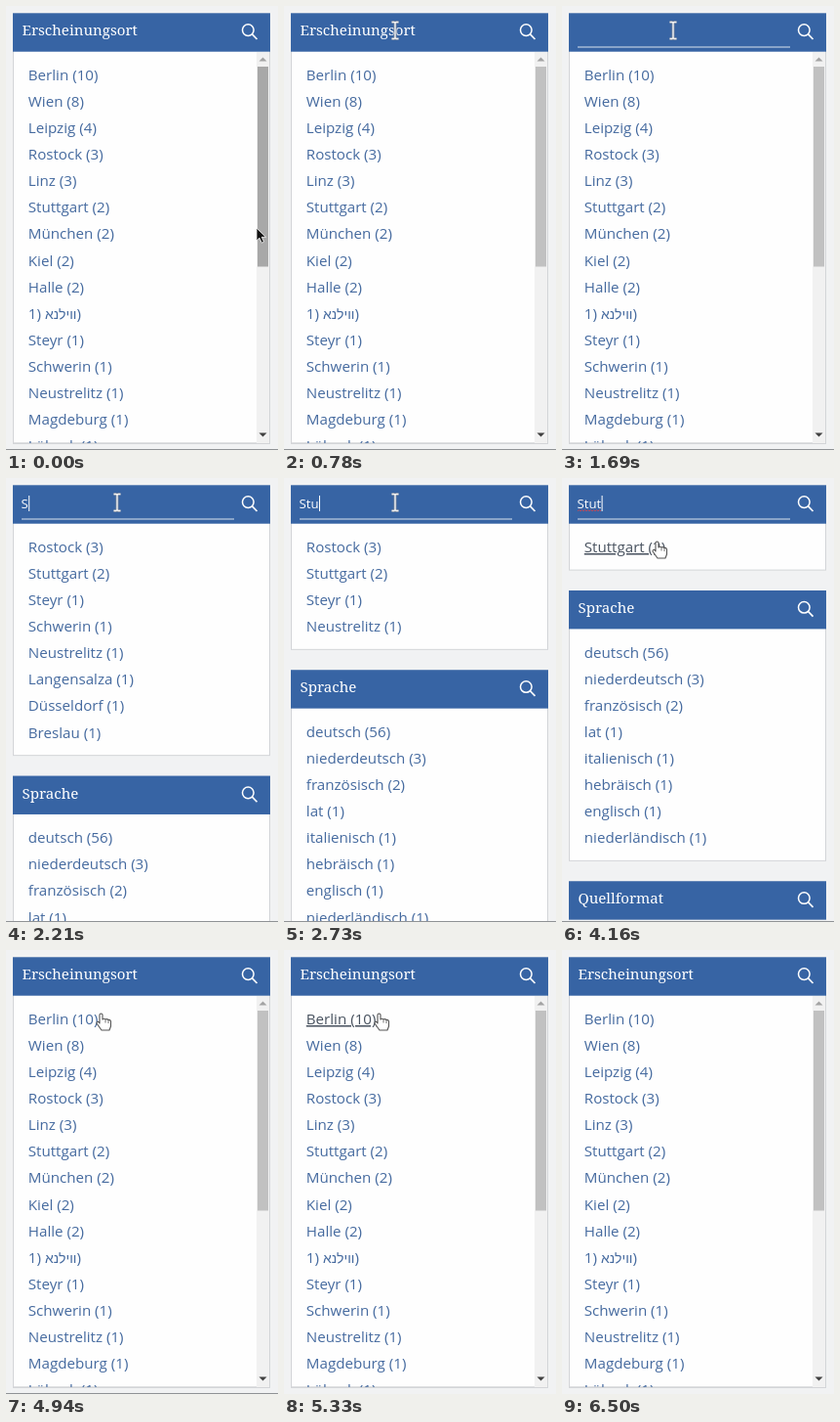
Recreate the animation shown at these times as an HTML page. Size 279 by 454 pixels, loop 8 s.

```html
<!DOCTYPE html>
<html lang="de">
<head>
<meta charset="utf-8">
<style>
html, body { margin: 0; width: 100%; height: 100%; overflow: hidden; background: #f1f2f3; }
svg { display: block; width: 279px; height: 454px; }
.title { font: 15.1px "Noto Serif", serif; fill: #fff; }
.item { font: 15.15px "Open Sans", "Noto Sans", sans-serif; fill: #456a9f; }
.hebrew { font: 14px "Liberation Sans", sans-serif; }
.hover { fill: #48525f; text-decoration: underline; }
.input { font: 13.2px "Open Sans", sans-serif; fill: #fff; }
</style>
</head>
<body>
<svg id="stage" viewBox="0 0 279 454"></svg>
<script>
const stage = document.getElementById("stage");
const STEP = 130, LOOP = 8000, ROW = 27.08, TOP = 7.3;
const places = ["Berlin (10)", "Wien (8)", "Leipzig (4)", "Rostock (3)", "Linz (3)", "Stuttgart (2)",
  "München (2)", "Kiel (2)", "Halle (2)", '1) <tspan class="hebrew">ווילנא</tspan>)', "Steyr (1)",
  "Schwerin (1)", "Neustrelitz (1)", "Magdeburg (1)", "Lübeck (1)"];
const matches = {
  S: ["Rostock (3)", "Stuttgart (2)", "Steyr (1)", "Schwerin (1)", "Neustrelitz (1)",
    "Langensalza (1)", "Düsseldorf (1)", "Breslau (1)"],
  St: ["Rostock (3)", "Stuttgart (2)", "Steyr (1)", "Neustrelitz (1)"],
  Stu: ["Stuttgart (2)"]
};
const languages = ["deutsch (56)", "niederdeutsch (3)", "französisch (2)", "lat (1)",
  "italienisch (1)", "hebräisch (1)", "englisch (1)", "niederländisch (1)"];

// Latest value whose start time has passed
const at = (t, keys) => keys.filter(k => k[0] <= t).pop()[1];
const rect = (x, y, w, h, fill, stroke = "none") =>
  `<rect x="${x}" y="${y}" width="${w}" height="${h}" fill="${fill}" stroke="${stroke}"/>`;
const path = (d, fill, stroke = "none", width = 1) =>
  `<path d="${d}" fill="${fill}" stroke="${stroke}" stroke-width="${width}" stroke-linejoin="round"/>`;
const text = (x, y, cls, s) => `<text x="${x}" y="${y}" class="${cls}">${s}</text>`;
const panelHeight = rows => 87.3 + ROW * (rows.length - 1);

function header(y, label) {
  return rect(7, y, 264, 39.4, "#3764a4") + text(16.5, y + 23, "title", label) +
    `<circle cx="248.3" cy="${y + 17.3}" r="5.8" fill="none" stroke="#fff" stroke-width="1.5"/>` +
    path(`M252.5 ${y + 21.5}l5 5.2`, "none", "#fff", 1.7);
}

function panel(y, label, rows, hover, height = panelHeight(rows)) {
  return rect(7.5, y + 20, 263, height - 20.5, "#fefefe", "#d3d5d8") + header(y, label) +
    rows.map((s, i) =>
      text(22.8, y + 68.7 + i * ROW, hover && !i ? "item hover" : "item", s)).join("");
}

function scrollbar(active) {
  return rect(257, 47, 13, 400, "#f1f1f1") + rect(258, 62, 11, 204.5, active ? "#a8a8a8" : "#c1c1c1") +
    path("M259.5 56.5h8l-4-4z", "#a3a3a3") + path("M259.5 436.5h8l-4 4z", "#404040");
}

function inputField(value, caret, wavy) {
  const end = 16 + [0, 7.2, 11.9, 20, 24.6][value.length];
  return text(15.5, 31, "input", value) + rect(16, 41.5, 218, 1, "#dbe4f0") +
    (caret ? rect(end, 18, 1, 16, "#fff") : "") +
    (wavy ? path("M16 34" + "l1.5 -1.5l1.5 1.5".repeat(8), "none", "#d4434d", 0.8) : "");
}

const beam = "M-3.5-8.5h2.5l1 1 1-1h2.5M-3.5 8.5h2.5l1-1 1 1h2.5M0-7.5v15";
const shapes = {
  arrow: path("M0 0v13l3-2.8 2.3 5 2.2-1-2.2-4.9h4.2z", "#111", "#fff", 0.8),
  beam: path(beam, "none", "#6b7d99", 3.2) + path(beam, "none", "#f4f4f4", 1.4),
  hand: path("M-4-7q1.5-2 3 0v5q1.5-1.5 3 0 1.5-1 3 .5 2-.5 2.5 1.5v5l-1.5 4h-8l-5-7q0-2 2-1.5l1 1.5z",
    "#fff", "#555", 1.1) + path("M2-1.5v3M5-1v3", "none", "#555", 0.8)
};

// Each move: start, first and last point, number of steps
const moves = [
  [0, 257, 227, 114, 25, 6],
  [3770, 114, 25, 100, 73, 3],
  [6110, 100, 73, 128, -20, 3]
];

function cursor(t) {
  if (t >= 6500) return "";
  const [start, x0, y0, x1, y1, n] = moves.filter(m => m[0] <= t).pop();
  const p = Math.min(1, Math.floor((t - start) / STEP) / n);
  const e = p * p * (3 - 2 * p);
  const shape = at(t, [[0, "arrow"], [780, "beam"], [4030, "arrow"], [4160, "hand"], [6240, "arrow"]]);
  return `<g transform="translate(${x0 + (x1 - x0) * e} ${y0 + (y1 - y0) * e})">${shapes[shape]}</g>`;
}

function scene(t) {
  const typing = t >= 1170 && t < 4940;
  const value = at(t, [[0, ""], [2210, "S"], [2470, "St"], [2730, "Stu"], [2990, "Stut"], [4810, ""]]);
  const query = at(t, [[0, ""], [2210, "S"], [2600, "St"], [2860, "Stu"], [4810, ""]]);
  const caret = at(t, [[0, true], [1690, false], [2210, true], [3510, false], [3900, true]]);
  const hover = (t >= 4160 && t < 4810) || (t >= 5200 && t < 6240);
  const label = typing ? "" : "Erscheinungsort";
  let out;
  if (query) {
    const rows = matches[query];
    const next = TOP + panelHeight(rows) + 20.4;
    out = panel(TOP, label, rows, hover) + panel(next, "Sprache", languages) +
      header(next + panelHeight(languages) + 20.4, "Quellformat");
  } else {
    out = panel(TOP, label, places, hover, 440) + rect(0, 447, 279, 7, "#f1f2f3") +
      rect(7, 447, 264, 1, "#d3d5d8") + scrollbar(t < STEP);
  }
  if (typing) out += inputField(value, caret, t >= 3510 && value);
  if (t < 5200) out += rect(0, 453, 279, 1, "#8f9295");
  return out + cursor(t);
}

let shown = "";
function draw(now) {
  const svg = scene(now % LOOP);
  if (svg !== shown) stage.innerHTML = shown = svg;
  requestAnimationFrame(draw);
}
draw(performance.now());
</script>
</body>
</html>
```
